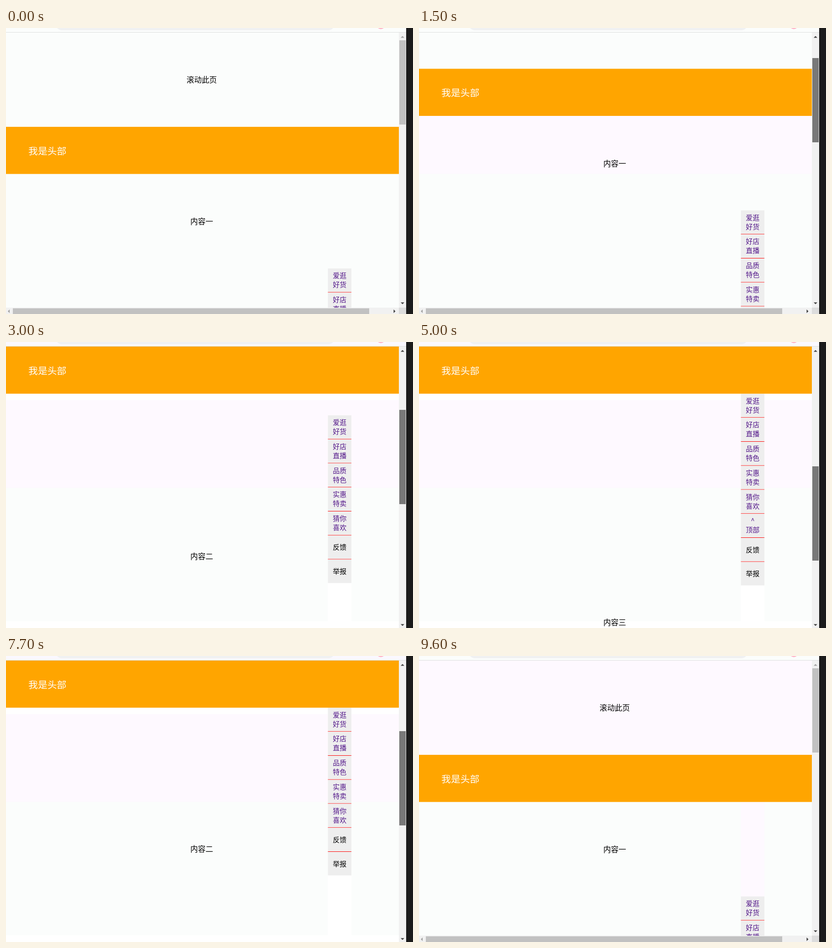
Write an HTML page that moves like this. It is 892 by 628 pixels and loops after 9700 ms.

```html
<!DOCTYPE html>
<html lang="zh">
<head>
<meta charset="utf-8">
<title>滚动此页</title>
<style>
  html, body { margin: 0; width: 100%; height: 100%; overflow: hidden; background: #fbfdfc; }
  svg { display: block; }
  text { font-family: "Noto Sans CJK SC", "Noto Sans CJK", sans-serif; font-weight: 350; text-anchor: middle; }
</style>
</head>
<body>
<svg id="stage" width="892" height="628" viewBox="0 0 892 628">
  <defs><clipPath id="view"><rect id="viewBox" y="10" width="861" height="618"/></clipPath></defs>
</svg>
<script>
const LOOP = 9700, TOP = 10, PIN_HEADER = 207, PIN_NAV = 414, SHOW_TOP = 518;
const BASE = '#fbfdfc', PINK = '#fef9ff', LINK = '#551a8b';
const stage = document.getElementById('stage');
const viewBox = document.getElementById('viewBox');

// Scroll offsets, one per 100 ms from the given start; the last one holds.
const runs = [
  [1000, [12, 36, 62, 85, 108, 127.5, 150, 172, 193, 208]],
  [2000, [230, 258, 275, 295, 318, 326, 333, 341, 348, 357]],
  [3000, [367, 386, 405, 434, 450, 471, 481, 509, 520, 531]],
  [4000, [558, 581]],
  [4300, [593, 601, 610, 621]],
  [4800, [654, 686, 740, 770, 800, 830, 862, 892, 922, 952]],
  [5800, [985, 1015, 1045, 1080, 1112, 1139]],
  [6800, [1118, 1060, 985, 900, 800, 699, 610, 530, 465, 414]],
  [7800, [360, 305, 250, 200, 152, 108.5, 65, 25, 0]]
];
const thumbColors = [[0, '#c1c1c1'], [400, '#b4b4b4'], [500, '#a8a8a8'],
  [700, '#787878'], [8800, '#a8a8a8'], [9000, '#c1c1c1']];

function scrollAt(t) {
  const run = runs.findLast(r => t >= r[0]);
  if (!run) return 0;
  const list = run[1];
  return list[Math.min(list.length - 1, Math.floor((t - run[0]) / 100))];
}

function set(el, attrs) {
  for (const k in attrs) el.setAttribute(k, attrs[k]);
  return el;
}
function add(parent, tag, attrs) {
  const el = document.createElementNS('http://www.w3.org/2000/svg', tag);
  parent.append(el);
  return set(el, attrs || {});
}
function rect(parent, x, y, width, height, fill) {
  return add(parent, 'rect', { x, y, width, height, fill });
}
// y is the middle of the glyphs
function label(parent, x, y, size, str, fill) {
  const el = add(parent, 'text', { x, y: y + size * 0.38, 'font-size': size, fill: fill || '#000' });
  el.textContent = str;
  return el;
}
function arrow(parent, x, y, turn) {
  return add(parent, 'path', { d: 'M-4 2L0 -2L4 2Z', transform: `translate(${x} ${y}) rotate(${turn})` });
}
function move(el, y) { set(el, { transform: `translate(0 ${y})` }); }
function span(el, from, to) { set(el, { y: from, height: Math.max(0, to - from) }); }
function show(el, on) { el.style.display = on ? '' : 'none'; }

// Page
const page = add(stage, 'g', { 'clip-path': 'url(#view)' });
rect(page, 0, 10, 861, 618, BASE);
const pink = rect(page, 0, 10, 861, 0, PINK);
const bands = add(page, 'g');
rect(bands, 0, 113, 861, 14.5, '#fff');
rect(bands, 0, 613, 861, 15, '#fff');
const lane = rect(page, 705.5, 0, 51.5, 0, PINK);
const laneWhite = rect(page, 705.5, 0, 51.5, 0, '#fff');
const intro = label(page, 429, 114, 16.6, '滚动此页');
const sections = ['一', '二', '三'].map(n => label(page, 429, 0, 16.6, '内容' + n));

// Side navigation
const PITCH = 52.75;
const nav = add(page, 'g');
function navItem(lines, fill, last) {
  const g = add(nav, 'g');
  rect(g, 705.5, 0, 51.5, 51.75, '#eee');
  if (!last) rect(g, 705.5, 51.75, 51.5, 1, '#f00');
  lines.forEach((s, i) => label(g, 731.3, lines.length > 1 ? 15.3 + i * 20 : 26, 15, s, fill));
  return g;
}
const items = [['爱逛', '好货'], ['好店', '直播'], ['品质', '特色'], ['实惠', '特卖'], ['猜你', '喜欢'], ['^', '顶部']]
  .map(lines => navItem(lines, LINK));
items.push(navItem(['反馈'], '#000'), navItem(['举报'], '#000', true));
const toTop = items[5];

const header = add(page, 'g');
rect(header, 0, 0, 861, 103.5, '#ffa500');
label(header, 90.7, 53, 20.8, '我是头部', '#fff');

// Browser edge
const strip = rect(stage, 0, 0, 877, 9, BASE);
add(stage, 'path', { d: 'M112 0H717Q713 5 706 5H123Q116 5 112 0Z', fill: '#f0f1f2' });
add(stage, 'circle', { cx: 821.5, cy: -7, r: 9.5, fill: '#ffb3c6' });
rect(stage, 0, 9, 877, 1, '#dcdedd');

// Scrollbars
rect(stage, 861, 10, 16, 618, '#f1f1f1');
const thumb = rect(stage, 862, 27, 14, 185, '#c1c1c1');
const up = arrow(stage, 869, 19.5, 0);
const down = arrow(stage, 869, 604.5, 180);
const across = add(stage, 'g');
rect(across, 0, 614, 861, 14, '#f1f1f1');
rect(across, 15, 615.5, 781, 12.5, '#c1c1c1');
set(arrow(across, 6, 622, -90), { fill: '#a3a3a3' });
set(arrow(across, 851.5, 622, 90), { fill: '#404040' });
rect(across, 861, 614, 16, 14, '#dcdcdc');
rect(stage, 877, 0, 15, 628, '#1b1b1b');

function draw(t) {
  const s = scrollAt(t);
  const pinned = s >= PIN_HEADER;
  const back = t >= 6800;
  const headY = pinned ? TOP : 217 - s;
  const headEnd = headY + 103.5;
  const navY = s >= PIN_NAV ? 113.5 : 528 - s;
  const withTop = s >= SHOW_TOP;

  set(viewBox, { height: pinned ? 618 : 604 });
  span(pink, back && !pinned ? TOP : pinned ? 127.5 : headEnd, t < 1000 ? 0 : 320.5);
  show(bands, pinned);
  set(strip, { fill: pinned ? '#faf8ff' : BASE });

  span(lane, headEnd, back && !pinned ? navY : 0);
  if (pinned) span(laneWhite, navY, 628);
  else span(laneWhite, headEnd, back ? 306 : 0);

  // A pinned header leaves the flow, so the sections move up by its height.
  const shift = (pinned ? 0 : 103.5) - s;
  move(intro, -s);
  [321.5, 838, 1356].forEach((y, i) => move(sections[i], y + shift));

  move(nav, navY);
  show(toTop, withTop);
  items.forEach((item, i) => move(item, PITCH * (i > 5 && !withTop ? i - 1 : i)));
  move(header, headY);

  set(thumb, {
    y: Math.round(27 + s * (pinned ? 1 / 3.007 : 571 / 1862)),
    height: pinned ? 207 : 185,
    fill: thumbColors.findLast(c => t >= c[0])[1]
  });
  set(up, { fill: s > 0 ? '#404040' : '#a3a3a3' });
  set(down, {
    fill: s < 1139 ? '#404040' : '#a3a3a3',
    transform: `translate(869 ${pinned ? 621.5 : 604.5}) rotate(180)`
  });
  show(across, !pinned);
}

const start = performance.now();
function tick() {
  draw((performance.now() - start) % LOOP);
  requestAnimationFrame(tick);
}
tick();
</script>
</body>
</html>
```
